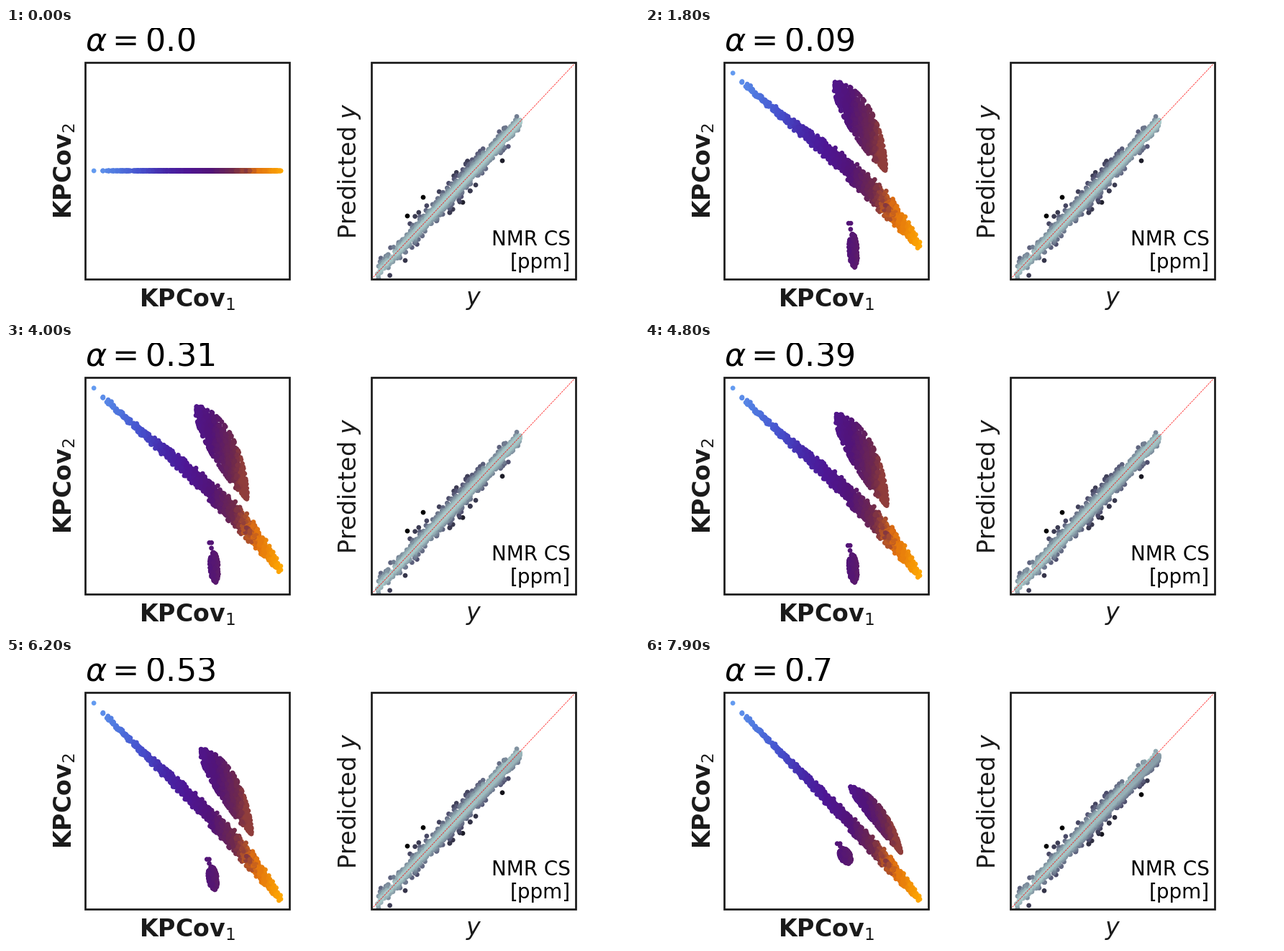
A matplotlib script that plays this animation: 880 by 400 pixels, repeating every 8 s.

```python
import numpy as np
import matplotlib.pyplot as plt
from matplotlib.animation import FuncAnimation
from matplotlib.colors import LinearSegmentedColormap
from matplotlib.patches import Rectangle

W, H, DPI = 880, 400, 100
FRAMES, INTERVAL, HOLD = 80, 100, 10
INK = "#1a1a1a"
LEFT, RIGHT, TOP = 110, 508, 48
PANEL_W, PANEL_H = 284, 302
PT = 72 / DPI
X0, X1 = 122, 382          # extent of the projected points
N_BAND, N_LOBE, N_DROP, N_FIT = 1500, 1200, 170, 1500
rng = np.random.default_rng(7)

plt.rcParams.update({"font.family": "DejaVu Sans", "mathtext.fontset": "dejavusans"})

HEAT = LinearSegmentedColormap.from_list("heat", [
    "#649bf0", "#4e76de", "#4650cd", "#4628a8", "#4e1694",
    "#521478", "#702a4b", "#e07010", "#ffa800"], N=512)

# Random coordinates inside each group, independent of alpha
band_t = rng.beta(2.4, 1.5, N_BAND)
band_t[:2] = 0, 1
band_d = np.clip(rng.normal(0, 0.5, N_BAND), -1.15, 1.15)
lobe_s = rng.beta(1.4, 1.5, N_LOBE)
lobe_s[:2] = 0, 1
lobe_d = np.clip(rng.normal(0, 0.55, N_LOBE), -1.1, 1.1)
angle = rng.uniform(0, 2 * np.pi, N_DROP)
radius = np.sqrt(rng.random(N_DROP))
drop_u, drop_v = radius * np.cos(angle), radius * np.sin(angle)
drop_u[:3], drop_v[:3] = (-0.8, -0.3, -0.4), (-1.6, -1.6, -1.25)


def band(a):
    """Long diagonal strip that straightens and thins as alpha grows."""
    t = band_t
    half = (3 + 9 * np.sin(np.pi * t ** 2.3)) * (1 - 0.7 * a ** 2)
    fall = min(274, 241 + 140 * a ** 2)
    bulge = 18 - 50 * a ** 4
    x = X0 + (X1 - X0) * t + 0.67 * half * band_d
    y = 63 + fall * t - bulge * np.sin(np.pi * t ** 1.8) - 0.74 * half * band_d
    return np.clip(x, X0, X1), y


def lobe(a):
    """Leaf along a quadratic curve, sliding down towards the strip."""
    s, shift = lobe_s, 90 * a ** 4
    y0, y2 = 75 + 255 * a ** 2.5, 195 + 130 * a ** 1.5
    y1 = (y0 + y2) / 2 - 11
    half = (17 - 33 * a ** 4) * np.sin(np.pi * s ** 0.85) ** 0.7
    p, q, r = (1 - s) ** 2, 2 * s * (1 - s), s ** 2
    x = 264 * p + 305 * q + 334 * r + shift + 0.76 * half * lobe_d
    y = y0 * p + y1 * q + y2 * r - 0.65 * half * lobe_d
    return x, y


def drop(a):
    """Small blob resting on the bottom, then rising and flattening."""
    ry = 24 - 27 * a ** 2
    cx = 289.5 - 94 * a ** 6
    cy = 334 - ry - 215 * max(0, a - 0.48)
    x = cx + (6 + 17 * a ** 6) * drop_u + (1 + 6 * a ** 3) * drop_v
    return x, cy + ry * drop_v


def cloud(a):
    return np.hstack([band(a), lobe(a), drop(a)]).T


order = rng.permutation(N_BAND + N_LOBE + N_DROP)
base = cloud(0.09)
tone = base[:, 0].copy()
tone[:N_BAND] += rng.normal(0, 6, N_BAND) * np.exp(-((tone[:N_BAND] - 338) / 14) ** 2)
tone[N_BAND:] = np.minimum(tone[N_BAND:], 326)
colors = HEAT((tone - X0) / (X1 - X0))[order]
flat = np.column_stack([base[:, 0], np.full(len(base), 199.0)])


def diagonal(x):
    return TOP + PANEL_H - (x - RIGHT) * PANEL_H / PANEL_W


# Parity points: narrow ridge, wider skirt and a few strays
fit_t = rng.beta(2, 1.3, N_FIT)
spread = np.where(rng.random(N_FIT) < 0.2, 12, 5.5) * (1 - 0.6 * fit_t ** 6)
fit_x = RIGHT + 207 * fit_t
fit_y = diagonal(fit_x) + np.clip(rng.normal(0, spread), -23, 23)
strays = np.array([(580, 236), (558, 262), (555, 324), (635, 243), (690, 185)])
fit_x, fit_y = np.r_[fit_x, strays[:, 0]], np.r_[fit_y, strays[:, 1]]
rank = np.argsort(-np.abs(fit_y - diagonal(fit_x)))
fit_x, fit_y = fit_x[rank], fit_y[rank]


def parity(a):
    y = fit_y + 7 * (a / 0.7) ** 2.5 * ((fit_x - RIGHT) / 207) ** 2
    err = np.abs(y - diagonal(fit_x))
    return np.column_stack([fit_x, y]), plt.cm.bone(0.76 * np.clip(1 - err / 35, 0, 1))


fig = plt.figure(figsize=(W / DPI, H / DPI), dpi=DPI, facecolor="white")
ax = fig.add_axes([0, 0, 1, 1])
ax.set(xlim=(0, W), ylim=(H, 0))
ax.axis("off")


def panel(x, points, rgba):
    """Framed box with its points clipped to it."""
    ax.add_patch(Rectangle((x, TOP), PANEL_W, PANEL_H, fill=False, ec=INK,
                           lw=2.7 * PT, zorder=5, joinstyle="miter"))
    dots = ax.scatter(*points.T, s=(6.7 * PT) ** 2, c=rgba, linewidths=0, zorder=2)
    dots.set_clip_path(Rectangle((x, TOP), PANEL_W, PANEL_H, transform=ax.transData))
    return dots


def label(x, y, text, px=33.3, color=INK, ha="center", **kw):
    return ax.text(x, y, text, fontsize=px * PT, color=color, ha=ha,
                   va="baseline", rotation_mode="anchor", zorder=6, **kw)


map_dots = panel(LEFT, flat[order], colors)
fit_dots = panel(RIGHT, *parity(0))
ax.plot([RIGHT, RIGHT + PANEL_W], [TOP + PANEL_H, TOP], color="red",
        ls="--", lw=0.7 * PT, zorder=4)

title = label(110, 31, "", 44.4, "black", "left")
label(252.5, 388, "KPCov$_1$", weight="bold")
label(91, 199, "KPCov$_2$", weight="bold", rotation=90)
label(650, 386, "$y$")
label(487, 199, "Predicted $y$", rotation=90)
label(785, 303, "NMR CS", 27.8, "black", "right")
label(785, 335, "[ppm]", 27.8, "black", "right")


def draw(n):
    a = max(0, n - HOLD + 1) / 100
    map_dots.set_offsets((cloud(a) if a else flat)[order])
    points, rgba = parity(a)
    fit_dots.set_offsets(points)
    fit_dots.set_facecolors(rgba)
    title.set_text(rf"$\alpha = {a}$")
    return map_dots, fit_dots, title


anim = FuncAnimation(fig, draw, frames=FRAMES, interval=INTERVAL,
                     init_func=lambda: draw(0), repeat=True, repeat_delay=0)
plt.show()
```
